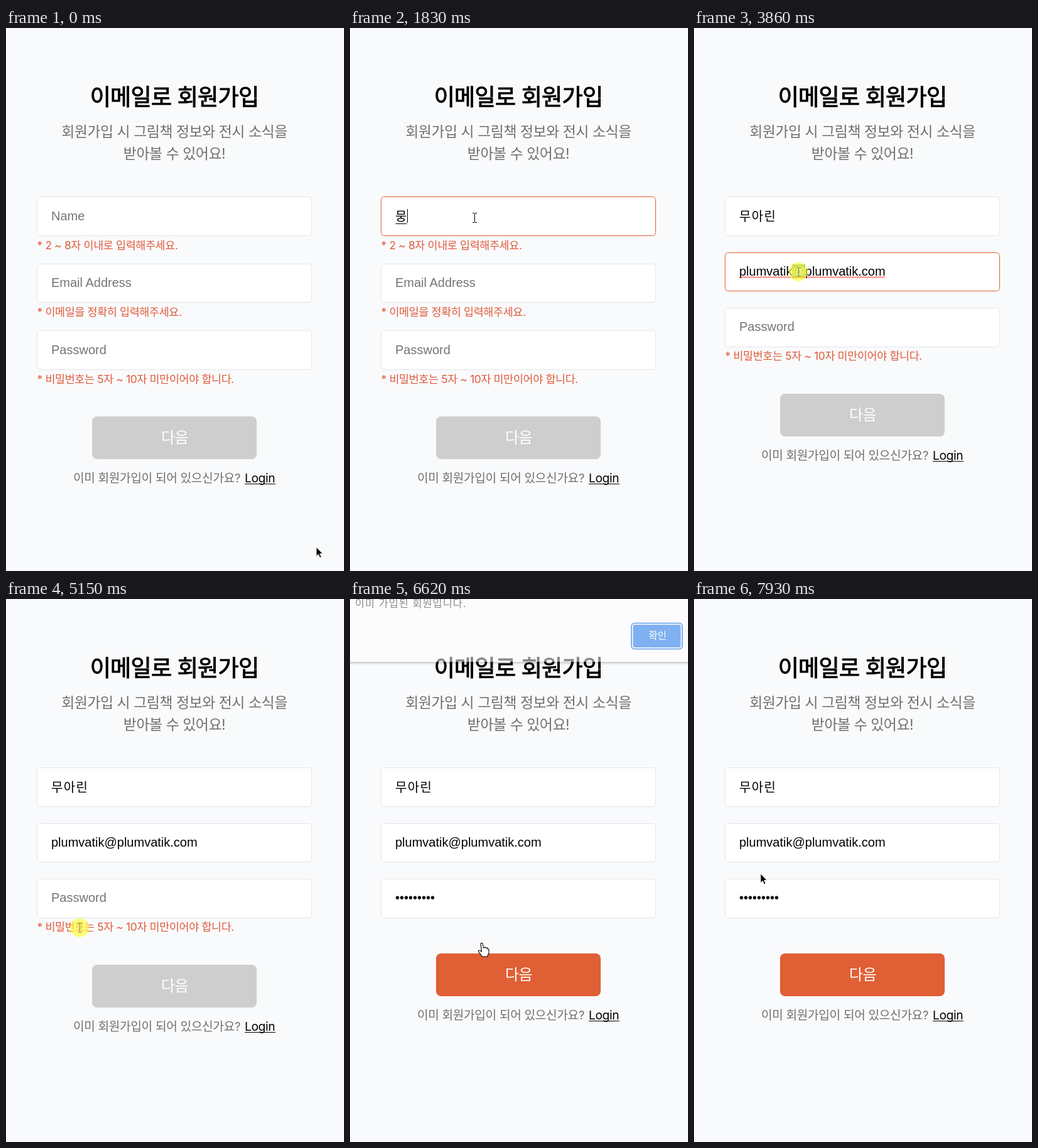
Write an HTML page that moves like this. It is 538 px wide and 864 px high and loops after 8 s.

```html
<!DOCTYPE html>
<html lang="ko">
<head>
<meta charset="utf-8">
<style>
  html, body { margin: 0; width: 100%; height: 100%; overflow: hidden; background: #f9fafc; }
  svg { display: block; width: 538px; height: 864px; }
  text { font-family: Inter, 'Noto Sans CJK KR', 'Noto Sans CJK', sans-serif; letter-spacing: -.02em; white-space: pre; }
  .mid { text-anchor: middle; }
  .title { font-size: 36px; stroke: #000; stroke-width: 1; }
  .input { font: 20px 'Liberation Sans', Arial, 'Noto Sans CJK KR', 'Noto Sans CJK', sans-serif; letter-spacing: 0; }
  .korean { letter-spacing: 1.4px; }
  .error { font-size: 17.4px; fill: #df5b3c; }
  .system { font-family: 'Noto Sans CJK KR', 'Noto Sans CJK', sans-serif; }
</style>
</head>
<body>
<svg viewBox="0 0 538 864">
  <rect width="538" height="864" fill="#f9fafc"/>
  <text class="title mid" x="268" y="123">이메일로 회원가입</text>
  <g class="mid" font-size="22.9" fill="#707070">
    <text x="268" y="172.5">회원가입 시 그림책 정보와 전시 소식을</text>
    <text x="268" y="207.5">받아볼 수 있어요!</text>
  </g>
  <g id="fields"></g>
  <g id="footer">
    <rect id="button" x="137" width="262" height="68" rx="8"/>
    <text class="mid" x="268.5" y="42" font-size="24" fill="#fff">다음</text>
    <text x="107" y="104.5" font-size="19.2" fill="#707070">이미 회원가입이 되어 있으신가요?</text>
    <text x="380" y="104.5" font-size="19.2">Login</text>
    <path d="M380 107.5h49" stroke="#000" stroke-width="1.2"/>
  </g>
  <g id="alert">
    <rect y="100" width="538" height="5" fill="url(#shade)"/>
    <rect width="538" height="100" fill="#fff"/>
    <text class="system" x="8" y="13" font-size="16.5" fill="#333" style="letter-spacing:.9px">이미 가입된 회원입니다.</text>
    <rect x="448" y="38.5" width="81" height="41" rx="5" fill="#fff" stroke="#1a73e8" stroke-width="2"/>
    <rect x="450.5" y="41" width="76" height="36" rx="3" fill="#1a73e8"/>
    <text class="system mid" x="489.5" y="64" font-size="15.8" fill="#fff">확인</text>
  </g>
  <g id="cursor">
    <circle id="press" r="15" fill="#ff3" fill-opacity=".65"/>
    <path id="arrow" d="M0 0V14.5L3.3 11.5 5.7 17 8 16 5.6 10.6H10Z" stroke="#fff" stroke-width=".8"/>
    <path id="beam" d="M-3 -7.5H-1L.5 -6.5 2 -7.5H4M.5 -6.5V6.5M-3 7.5H-1L.5 6.5 2 7.5H4" fill="none"/>
    <path id="hand" d="M-1 1.5Q0 -.5 2 1L3.5 8 6 7 7.5 8.5 9.5 8 10.5 10Q12 9.5 12 12V16L9.5 22H1.5L-4.5 14Q-4.5 11 -2 12.5L.5 14Z" fill="#fff" stroke="#000" stroke-width="1.1"/>
  </g>
  <defs>
    <linearGradient id="shade" x2="0" y2="1">
      <stop stop-color="#000" stop-opacity=".35"/><stop offset="1" stop-color="#000" stop-opacity="0"/>
    </linearGradient>
  </defs>
</svg>
<script>
const DURATION = 8000, BLINK = 530, KEY_GAP = 90, GLIDE = 340, PRESS = 140;
const ROW = 106.5, ERROR_HEIGHT = 18.2;
const $ = id => document.getElementById(id);
const show = (el, on) => el.setAttribute('visibility', on ? 'visible' : 'hidden');
const clamp = v => Math.max(0, Math.min(1, v));

// Each field is focused from..to and receives its keystrokes from typeAt on
const fields = [
  { label: 'Name', error: '* 2 ~ 8자 이내로 입력해주세요.', from: 560, to: 2490, typeAt: 1640,
    strokes: 'ㅁ 무 뭉 무아 무알 무아리 무아린'.split(' '), valid: v => v.length >= 2, composes: true },
  { label: 'Email Address', error: '* 이메일을 정확히 입력해주세요.', from: 2490, to: 5090, typeAt: 2970,
    strokes: ['plumvatik@plumvatik.com'], valid: v => v.includes('@'), doubleClick: 3790 },
  { label: 'Password', error: '* 비밀번호는 5자 ~ 10자 미만이어야 합니다.', from: 5560, to: 6020, typeAt: 5630,
    strokes: ['•'.repeat(9)], valid: v => v.length >= 5 }
];

// The pointer glides to each stop, takes its shape on arrival and may click there
const stops = [
  { at: 0, x: 494, y: 826, shape: 'arrow' },
  { at: 410, x: 198, y: 302, shape: 'beam', click: 560 },
  { at: 3720, x: 166, y: 388, shape: 'beam', click: 3790 },
  { at: 4200, x: 156, y: 453, shape: 'beam' },
  { at: 4480, x: 150, y: 391, shape: 'beam', click: 4480 },
  { at: 5020, x: 112, y: 452, shape: 'beam' },
  { at: 5090, x: 117, y: 523, shape: 'beam', click: 5090 },
  { at: 5560, x: 130, y: 478, shape: 'beam', click: 5560 },
  { at: 5960, x: 213, y: 597, shape: 'hand', click: 6020 },
  { at: 6830, x: 202, y: 466, shape: 'hand' },
  { at: 7170, x: 489, y: 60, shape: 'arrow', click: 7190 },
  { at: 7930, x: 106, y: 437, shape: 'arrow' }
];

$('fields').innerHTML = fields.map(f => `
  <g>
    <rect class="box" x="49.5" width="437" rx="5" fill="#fff"/>
    <rect class="selection" height="22" fill="#7a9e8a"/>
    <text class="input" x="72"></text>
    <path class="mark" fill="none"/>
    <path class="caret" stroke="#000"/>
    <text class="error" x="49.5">${f.error}</text>
  </g>`).join('');
fields.forEach((f, i) => {
  for (const part of ['box', 'selection', 'input', 'mark', 'caret', 'error'])
    f[part] = $('fields').children[i].querySelector('.' + part);
});

function zigzag(from, to, y) {
  let d = `M${from} ${y}`;
  for (let x = from + 2, up = true; x <= to; x += 2, up = !up) d += `L${x} ${up ? y - 2 : y}`;
  return d;
}

// A double click selects the "@", a third click everything, a later click nothing
function selectionAt(f, t) {
  const since = t - f.doubleClick, length = f.strokes[0].length, at = f.strokes[0].indexOf('@');
  if (!(since >= 70 && since < 690)) return [0, 0];
  return since < 140 ? [at, at + 1] : [0, length];
}

function drawField(f, t, top) {
  const stroke = Math.min(Math.floor((t - f.typeAt) / KEY_GAP), f.strokes.length - 1);
  const value = f.strokes[stroke] || '';
  const focused = t >= f.from && t < f.to, valid = f.valid(value);
  const [from, to] = selectionAt(f, t);
  const line = Math.round(top + 37.3), boxTop = Math.round(top);

  f.box.setAttribute('y', boxTop + .5);
  f.box.setAttribute('height', Math.round(top + 61.6) - boxTop);
  f.box.setAttribute('stroke', focused ? '#e05f34' : '#e4e4e6');
  f.error.setAttribute('y', Math.round(top + 83.5));
  show(f.error, !valid);

  const korean = f.composes && value;
  f.input.setAttribute('fill', value ? '#000' : '#757575');
  f.input.setAttribute('y', korean ? line + 1 : line);
  f.input.classList.toggle('korean', !!korean);
  f.input.innerHTML = value
    ? `${value.slice(0, from)}<tspan fill="#fff">${value.slice(from, to)}</tspan>${value.slice(to)}`
    : f.label;
  const xAt = n => 72 + (n ? f.input.getSubStringLength(0, n) : 0);

  show(f.selection, to > from);
  f.selection.setAttribute('x', xAt(from));
  f.selection.setAttribute('y', line - 18);
  f.selection.setAttribute('width', xAt(to) - xAt(from));

  const lastInput = stroke < 0 ? f.from : f.typeAt + stroke * KEY_GAP;
  const lit = Math.floor((t - lastInput) / BLINK) % 2 === 0;
  f.caret.setAttribute('d', `M${Math.floor(xAt(value.length)) + .5} ${line - 18}v22`);
  show(f.caret, focused && lit && to === from);

  // Underline of the syllable being composed, or spelling squiggle
  const composing = focused && korean, misspelt = focused && t >= f.doubleClick;
  show(f.mark, composing || misspelt);
  if (composing) f.mark.setAttribute('d', `M${xAt(value.length - 1) + .5} ${line + 5.5}h18`);
  if (misspelt) f.mark.setAttribute('d', zigzag(72, xAt(value.length), line + 3.5));
  f.mark.setAttribute('stroke', composing ? '#000' : '#f00');
  return valid;
}

function drawPointer(t) {
  const last = stops.findLastIndex(s => s.at <= t), here = stops[last], next = stops[last + 1] || here;
  const glide = Math.min(GLIDE, next.at - here.at) || 1;
  const k = clamp((t - next.at + glide) / glide);
  const between = axis => Math.round(here[axis] + (next[axis] - here[axis]) * k);
  const pressed = stops.some(s => t >= s.click && t < s.click + PRESS);
  $('cursor').setAttribute('transform', `translate(${between('x')} ${between('y')})`);
  for (const shape of ['arrow', 'beam', 'hand']) show($(shape), shape === here.shape);
  show($('press'), pressed);
  $('beam').setAttribute('stroke', pressed ? '#886' : '#000');
}

function render(t) {
  let hidden = 0;
  fields.forEach((f, i) => {
    if (drawField(f, t, 268.3 + ROW * i - ERROR_HEIGHT * hidden)) hidden++;
  });
  $('footer').setAttribute('transform', `translate(0 ${Math.round(618.3 - ERROR_HEIGHT * hidden)})`);
  $('button').setAttribute('fill', hidden === fields.length ? '#e05f34' : '#cecece');
  $('alert').setAttribute('opacity', clamp((t - 6480) / 260) * clamp((7430 - t) / 130));
  drawPointer(t);
}

function frame(now) {
  render(now % DURATION);
  requestAnimationFrame(frame);
}
render(0);
requestAnimationFrame(frame);
</script>
</body>
</html>
```
